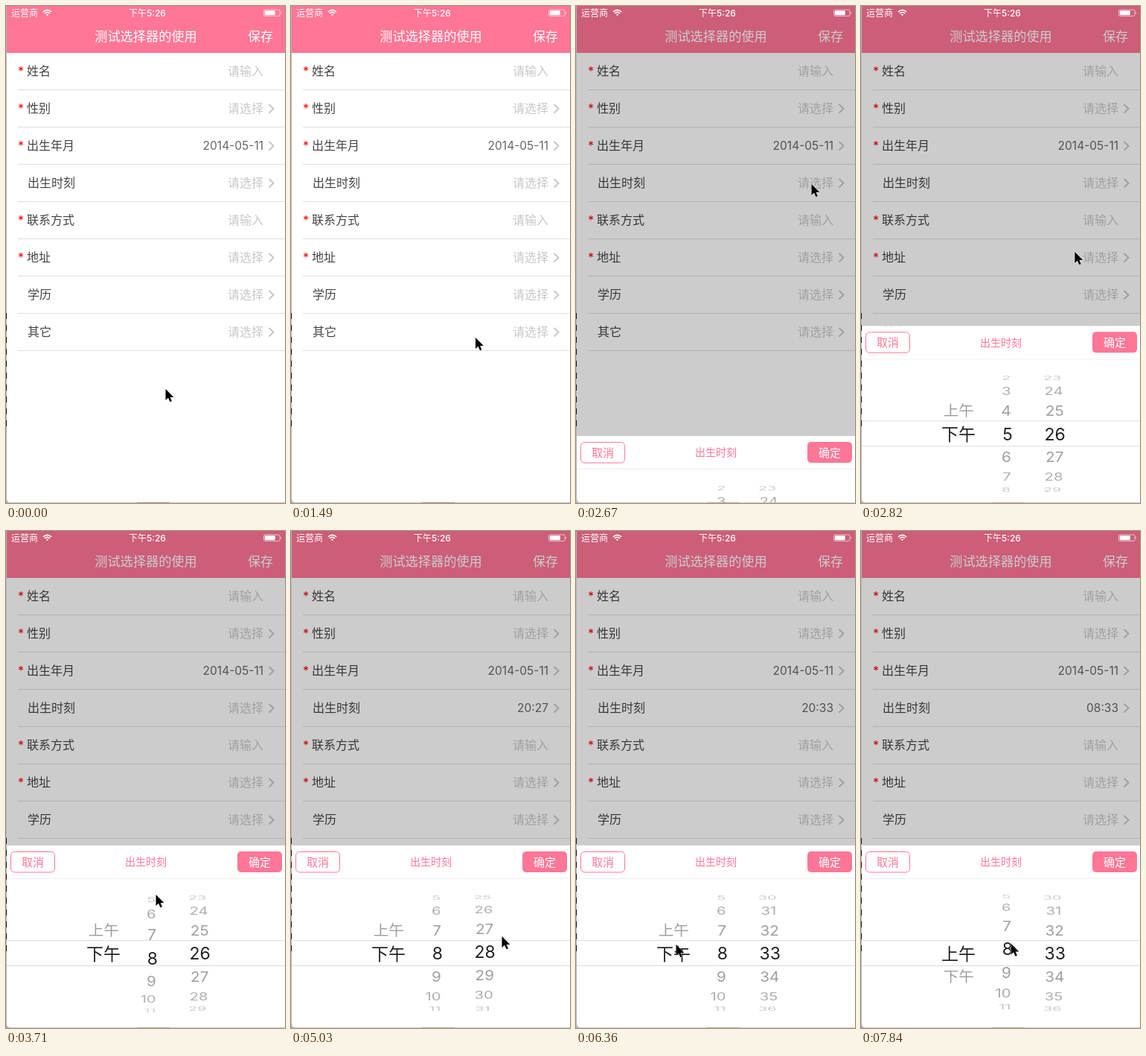
Animation, 375 px wide and 667 px high, one loop 7990 ms. Source, as an HTML page:

```html
<!DOCTYPE html>
<html lang="zh-CN">
<head>
<meta charset="utf-8">
<title>测试选择器的使用</title>
<style>
html, body { margin: 0; width: 100%; height: 100%; overflow: hidden; background: #b4b4b4; }
svg { display: block; width: 375px; height: 667px; }
text { font-family: Inter, "Noto Sans CJK SC", "Noto Sans CJK", sans-serif; }
</style>
</head>
<body>
<svg id="stage" viewBox="0 0 375 667">
  <defs>
    <clipPath id="screen"><path d="M1 0H376V666.3H6Q1 666.3 1 661Z"/></clipPath>
    <clipPath id="band"><rect x="0" y="128" width="375" height="33"/></clipPath>
    <clipPath id="outside"><path d="M0 45H375V128H0ZM0 161H375V245H0Z"/></clipPath>
  </defs>
  <rect width="375" height="667" fill="#b4b4b4"/>
  <path d="M.5 412V565" stroke="#111" stroke-dasharray="8 8"/>
  <path d="M176 666.5H220" stroke="#777"/>
  <g clip-path="url(#screen)">
    <rect width="375" height="667" fill="#fff"/>
    <rect width="375" height="63" fill="#ff7696"/>
    <g fill="#fff" font-size="17">
      <text x="188" y="47" text-anchor="middle" font-weight="500" font-size="17.2">测试选择器的使用</text>
      <text x="342" y="47" text-anchor="middle">保存</text>
    </g>
    <g id="form" font-size="16"></g>
    <rect id="dim" width="375" height="667" fill="#000" opacity=".2"/>
    <g fill="#fff" font-size="12">
      <text x="7" y="13.5">运营商</text>
      <text x="190" y="13.5" text-anchor="middle" font-weight="500">下午5:26</text>
      <g fill="none" stroke="#fff" stroke-width="1.6">
        <path d="M50 7.8Q55.5 2.8 61 7.8M52 10Q55.5 6.8 59 10"/>
        <path d="M55.5 13.2L53.9 11.4Q55.5 10.2 57.1 11.4Z" fill="#fff" stroke="none"/>
        <rect x="346.5" y="5" width="21.5" height="8.5" rx="1.8" stroke-width=".8" opacity=".75"/>
      </g>
      <rect x="347.8" y="6.2" width="14" height="6" rx=".8"/>
      <path d="M369 7.7Q371 9.2 369 10.8Z" opacity=".8"/>
    </g>
    <g id="panel">
      <rect width="375" height="246" fill="#fff"/>
      <rect x="6.5" y="8.5" width="59" height="27.5" rx="5" fill="none" stroke="#ff7696"/>
      <rect x="311" y="8" width="60" height="28" rx="5" fill="#ff7696"/>
      <g text-anchor="middle" fill="#ff7696" font-size="15">
        <text x="36" y="27.7">取消</text>
        <text x="188" y="27.3" font-size="14">出生时刻</text>
        <text x="341" y="27.7" fill="#fff">确定</text>
      </g>
      <path d="M0 44.5H375" stroke="#eee"/>
      <g id="rows" clip-path="url(#outside)"></g>
      <g id="picked" clip-path="url(#band)"></g>
      <path d="M0 127.5H375M0 161.5H375" stroke="#dcdcdc"/>
    </g>
  </g>
  <path id="cursor" d="M0 0V15L3.5 11.8L6 17.2L8.4 16.2L6.1 11H10.8Z" stroke="#fff" stroke-width="1" stroke-linejoin="round" paint-order="stroke"/>
</svg>
<script>
const $ = id => document.getElementById(id);
const LOOP = 7990, REST = 1200, TICK = 147.5;
const PANEL_TOP = 422, PANEL_HEIGHT = 245;

// Tracks: [tick, value...]; the screen refreshes once per tick.
const cursorTrack = [
  [-1, 214.5, 514], [2, 248, 445], [6, 321, 262], [8, 316.5, 239], [10, 316.5, 239],
  [13, 204, 590], [14, 203, 590], [17, 201.5, 488], [20, 262, 597], [22, 262, 566],
  [25, 284, 578], [26, 283.5, 544], [28, 285, 495], [30, 284, 500], [35, 134.5, 555],
  [37, 134.5, 557], [39, 136, 602], [40, 136, 602], [43, 201.5, 560], [45, 201.5, 553.5]
];
const riseTrack = [[9, 0], [10, .367], [11, .97], [12, 1]];
const periodTrack = [[36, 1], [40, 0]];
const hourTrack = [[14, 5], [17, 7.8], [18, 8], [43, 8], [45, 8.18]];
const minuteTrack = [[20, 26], [23, 27], [25, 27], [26, 28.07], [28, 30], [30, 32.2], [33, 33]];
const valueSteps = [[19, '20:26'], [24, '20:27'], [34, '20:33'], [41, '08:33']];

const wheels = [
  { track: periodTrack, min: 0, max: 1, x: 131, bigX: 131, anchor: 'middle', label: n => ['上午', '下午'][n] },
  { track: hourTrack, min: 1, max: 12, x: 202, bigX: 204, anchor: 'end', label: String },
  { track: minuteTrack, min: 0, max: 59, x: 260.7, bigX: 260.7, anchor: 'middle',
    label: n => String(n).padStart(2, '0') }
];

function sample(track, t) {
  if (t <= track[0][0]) return track[0].slice(1);
  for (let i = 1; i < track.length; i++) {
    const a = track[i - 1], b = track[i];
    if (t > b[0]) continue;
    const p = (t - a[0]) / (b[0] - a[0]), e = p * p * (3 - 2 * p);
    return a.slice(1).map((v, j) => v + (b[j + 1] - v) * e);
  }
  return track[track.length - 1].slice(1);
}

function buildForm() {
  const fields = [
    ['姓名', 1, 0], ['性别', 1, 1], ['出生年月', 1, 1], ['出生时刻', 0, 1],
    ['联系方式', 1, 0], ['地址', 1, 1], ['学历', 0, 1], ['其它', 0, 1]
  ];
  $('form').innerHTML = fields.map(([name, needed, choice], i) => {
    const y = 87 + i * 50;
    return (needed ? `<text x="16" y="${y + 6}" fill="#f00">*</text>` : '') +
      `<text x="${needed ? 28 : 29}" y="${y + 6}" fill="#444">${name}</text>` +
      `<text class="value" x="346" y="${y + 6}" text-anchor="end">${choice ? '请选择' : '请输入'}</text>` +
      (choice ? `<path d="M353.5 ${y - 5}L359.5 ${y + .8}L353.5 ${y + 6.6}" fill="none" stroke="#c7c7cc" stroke-width="2"/>` : '') +
      `<path d="M16 ${y + 25.5}H375" stroke="#dedede"/>`;
  }).join('');
  return [...document.querySelectorAll('.value')];
}

function setValue(node, text) {
  const filled = /\d/.test(text);
  node.textContent = text;
  node.setAttribute('fill', filled ? '#666' : '#c8c8cb');
  node.setAttribute('font-size', filled ? 15.5 : 16);
  node.setAttribute('font-weight', filled ? 400 : 300);
}

function rowText(wheel, n, x, y, sx, sy, size, alpha) {
  const base = size * (wheel.track === periodTrack ? .38 : .364);
  return `<text transform="translate(${x} ${y}) scale(${sx} ${sy})" y="${base}" font-size="${size}" ` +
    `text-anchor="${wheel.anchor}" fill-opacity="${alpha}">${wheel.label(n)}</text>`;
}

// Rows sit on a cylinder; the band in the middle shows an enlarged copy.
function drawWheels(tick) {
  const ANGLE = .4, RADIUS = 80, DEPTH = 1000, MID_X = 188, MID_Y = 145;
  let rows = '', picked = '';
  for (const w of wheels) {
    const [pos] = sample(w.track, tick);
    const from = Math.max(w.min, Math.ceil(pos - 3.85)), to = Math.min(w.max, Math.floor(pos + 3.85));
    for (let n = from; n <= to; n++) {
      const d = n - pos, c = Math.cos(d * ANGLE), dy = RADIUS * Math.sin(d * ANGLE);
      const s = 1 / (1 + RADIUS * (1 - c) / DEPTH);
      rows += rowText(w, n, MID_X + (w.x - MID_X) * s, MID_Y + dy, s, s * c, 20.8, .4 * c ** .6);
      if (Math.abs(d) < 1) picked += rowText(w, n, w.bigX, MID_Y + dy * 1.06, 1, c, 23, .87);
    }
  }
  $('rows').innerHTML = rows;
  $('picked').innerHTML = picked;
}

const values = buildForm();
values.forEach(v => setValue(v, v.textContent));
setValue(values[2], '2014-05-11');

function draw(tick) {
  const [x, y] = sample(cursorTrack, tick);
  const [rise] = sample(riseTrack, tick);
  $('cursor').setAttribute('transform', `translate(${x} ${y})`);
  $('dim').setAttribute('visibility', rise > 0 ? 'visible' : 'hidden');
  $('panel').setAttribute('visibility', rise > 0 ? 'visible' : 'hidden');
  $('panel').setAttribute('transform', `translate(0 ${PANEL_TOP + PANEL_HEIGHT * (1 - rise)})`);
  const step = valueSteps.filter(s => s[0] <= tick).pop();
  setValue(values[3], step ? step[1] : '请选择');
  drawWheels(tick);
}

const start = performance.now();
let shown = null;
function frame() {
  const t = (performance.now() - start) % LOOP;
  const tick = Math.min(45, Math.max(-1, Math.floor((t - REST + 8) / TICK)));
  if (tick !== shown) draw(shown = tick);
  requestAnimationFrame(frame);
}
frame();
</script>
</body>
</html>
```
